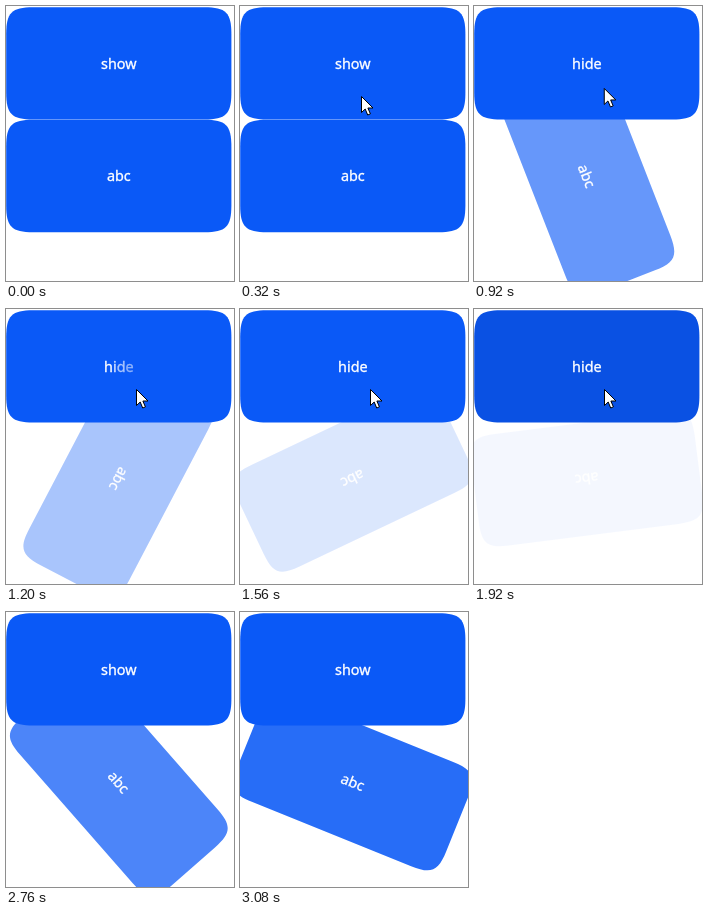
An HTML page for the animation above (3120 ms loop, 228x275 px).

```html
<!DOCTYPE html>
<html lang="en">
<head>
<meta charset="utf-8">
<style>
  html, body { margin: 0; width: 100%; height: 100%; overflow: hidden; background: #fff; }
  svg { display: block; width: 228px; height: 275px; overflow: hidden; }
  text {
    font: 500 14.4px "Noto Sans", sans-serif; text-anchor: middle;
    color: #fff; fill: currentColor; stroke: currentColor; stroke-width: .35px;
  }
  tspan { fill: currentColor; stroke: currentColor; }
</style>
</head>
<body>
<svg viewBox="0 0 228 275">
  <defs><path id="shape"/></defs>
  <g id="panel"><use href="#shape" fill="#0a59f7"/><text y="5.3">abc</text></g>
  <g transform="translate(112.8 57.4)">
    <use id="toggle" href="#shape"/>
    <text y="5.3"><tspan></tspan><tspan></tspan><tspan></tspan><tspan></tspan></text>
  </g>
  <path id="cursor" d="M.5 .5V16.5L4.2 13L6.7 19L9.4 17.9L6.9 12H12Z" fill="#fff" stroke="#000" stroke-linejoin="round"/>
</svg>
<script>
const LOOP = 3120, BLUE = "#0a59f7", PRESSED = "#0a51e3";
const HIDE_AT = 454, HIDE_TIME = 1963, SHOW_AT = 2110;
const PRESS = [1880, 2040];
const SWEEPS = [1040, 2240];

// Cursor waypoints: time, x, y
const PATH = [
  [120, -14, 136], [160, 1, 128], [240, 80, 61], [320, 121, 90], [480, 121, 90],
  [640, 128, 96], [960, 130, 80], [2080, 130, 80], [2240, -15, 125]
];

const find = id => document.getElementById(id);
const panel = find("panel"), toggle = find("toggle"), cursor = find("cursor");
const letters = [...document.querySelectorAll("tspan")];
const clamp = v => Math.min(1, Math.max(0, v));

// Centred rectangle with continuous-curvature corners
function smoothRect(w, h, reach, pull) {
  const x = w / 2, y = h / 2, a = reach, b = reach * pull;
  return `M${a - x} ${-y}H${x - a}C${x - b} ${-y} ${x} ${b - y} ${x} ${a - y}
    V${y - a}C${x} ${y - b} ${x - b} ${y} ${x - a} ${y}
    H${a - x}C${b - x} ${y} ${-x} ${y - b} ${-x} ${y - a}
    V${a - y}C${-x} ${b - y} ${b - x} ${-y} ${a - x} ${-y}Z`;
}
find("shape").setAttribute("d", smoothRect(225.2, 112.4, 27, 0.2));

// cubic-bezier(.25, .1, .25, 1)
function ease(x) {
  if (x <= 0 || x >= 1) return clamp(x);
  let lo = 0, hi = 1, s;
  for (let i = 0; i < 24; i++) {
    s = (lo + hi) / 2;
    if (0.75 * s * (1 - s) + s ** 3 < x) lo = s; else hi = s;
  }
  return 0.3 * s * (1 - s) ** 2 + 3 * s * s * (1 - s) + s ** 3;
}

// Overdamped spring from 0 to 1
function spring(ms) {
  const t = Math.max(0, ms), fast = 0.009, slow = 0.0025;
  return 1 - (fast * Math.exp(-slow * t) - slow * Math.exp(-fast * t)) / (fast - slow);
}

// The label dims, then brightens letter by letter
function brightness(t, i) {
  return Math.min(...SWEEPS.map(start => {
    const u = t - start;
    const dim = clamp(-u / 60), lit = clamp((u - i * 60) / 160);
    return 0.55 + 0.45 * Math.max(dim, lit);
  }));
}

function moveCursor(t) {
  const next = PATH.findIndex(p => p[0] > t);
  cursor.style.display = next < 1 ? "none" : "inline";
  if (next < 1) return;
  const [t0, x0, y0] = PATH[next - 1], [t1, x1, y1] = PATH[next];
  const k = (t - t0) / (t1 - t0);
  cursor.setAttribute("transform", `translate(${x0 + (x1 - x0) * k} ${y0 + (y1 - y0) * k})`);
}

function draw(t) {
  const hidden = clamp(ease((t - HIDE_AT) / HIDE_TIME) - spring(t - SHOW_AT));
  panel.setAttribute("transform", `translate(112.8 170) rotate(${180 * hidden})`);
  panel.style.opacity = 1 - hidden;

  const label = t >= HIDE_AT && t < SHOW_AT ? "hide" : "show";
  letters.forEach((span, i) => {
    span.textContent = label[i];
    span.style.color = `color-mix(in srgb, #fff ${100 * brightness(t, i)}%, ${BLUE})`;
  });
  toggle.style.fill = t >= PRESS[0] && t < PRESS[1] ? PRESSED : BLUE;
  moveCursor(t);
}

const start = performance.now();
function tick() {
  draw((performance.now() - start) % LOOP);
  requestAnimationFrame(tick);
}
tick();
</script>
</body>
</html>
```
